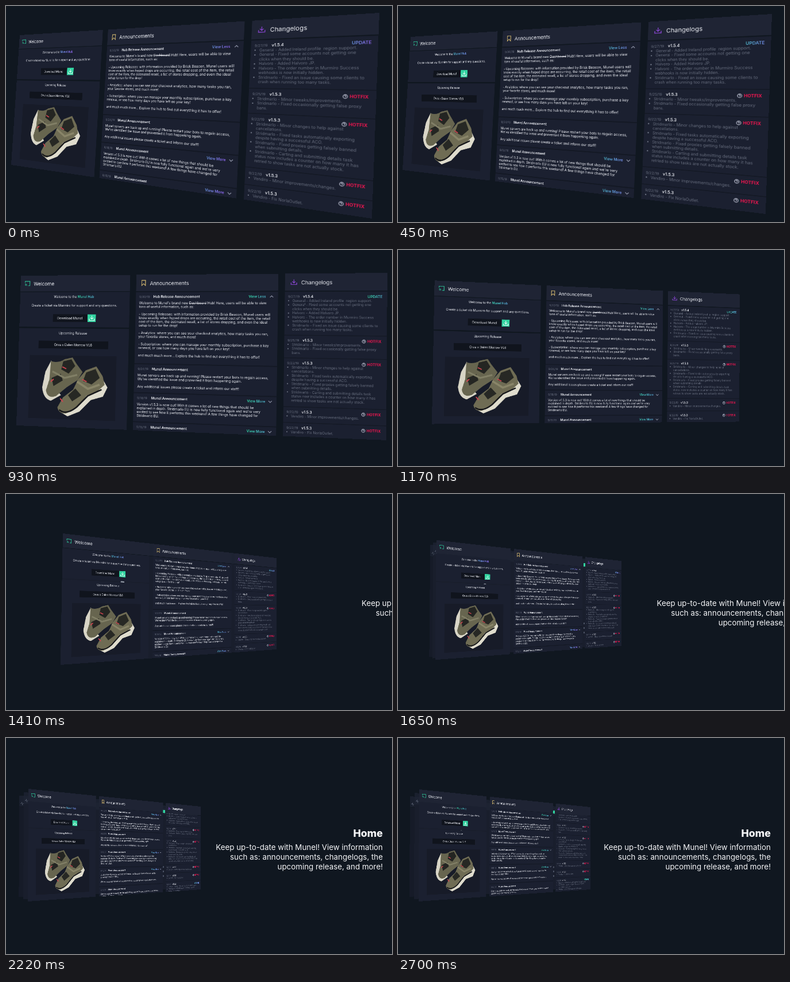
Animation, 672 px wide and 378 px high, one loop 2730 ms. Source, as an HTML page:

```html
<!DOCTYPE html>
<html lang="en">
<head>
<meta charset="utf-8">
<title>Dashboard tour</title>
<style>
html, body { margin: 0; width: 100%; height: 100%; overflow: hidden; background: #101720; }
body { position: relative; font-family: Inter, sans-serif; color: #eceef4; }
.plane, .box, .text, svg { position: absolute; }
.plane { left: 0; top: 0; width: 960px; height: 415px; transform-origin: 0 0; }
.box { overflow: hidden; }
.group { position: absolute; left: 0; top: 0; }
.text { white-space: pre; line-height: 10px; }
.center { transform: translateX(-50%); }
.dim { color: #666c7d; }
.bold { font-weight: 600; }
.hot { color: #ee1650; font-weight: 700; }
.shine {
  font-weight: 600; color: transparent;
  background: linear-gradient(90deg, #31d8a6, #5ba3d8 50%, #8d62ec) var(--shine) 0 / 260% 100%;
  -webkit-background-clip: text; background-clip: text;
}
svg { overflow: visible; fill: none; stroke-width: 1.5; }
#copy { position: absolute; left: 249px; top: 157px; width: 400px; text-align: right; white-space: pre; color: #f5f6f8; }
#copy b { display: block; font-size: 17.8px; font-weight: 800; line-height: 20px; margin-bottom: 6px; }
#copy div { font-size: 13.35px; line-height: 17px; }
</style>
</head>
<body>
<div class="plane" id="back2"></div>
<div class="plane" id="back1"></div>
<div class="plane" id="board"></div>
<div id="copy"><b>Home</b><div>Keep up-to-date with Munel! View information
such as: announcements, changelogs, the
upcoming release, and more!</div></div>
<script>
const LOOP = 2730, W = 960, H = 415, TURN = 1410;
const HEAD = '#1f2434', CARD = '#1b2030', SEAM = '#141925', DARK = '#10141d';
const $ = id => document.getElementById(id);
const board = $('board');

function box(parent, x, y, w, h, color) {
  const el = document.createElement('div');
  el.className = 'box';
  el.style.cssText = `left:${x}px;top:${y}px;width:${w}px;height:${h}px;background:${color}`;
  return parent.appendChild(el);
}
function group(parent) {
  const el = document.createElement('div');
  el.className = 'group';
  return parent.appendChild(el);
}
function text(parent, x, y, size, html, cls = '') {
  const el = document.createElement('div');
  el.className = 'text ' + cls;
  el.style.cssText = `left:${x}px;top:${y - 5}px;font-size:${size}px`;
  el.innerHTML = html;
  return parent.appendChild(el);
}
function icon(parent, x, y, color, path, extra = '') {
  parent.insertAdjacentHTML('beforeend',
    `<svg style="left:${x}px;top:${y}px" width="1" height="1" stroke="${color}"><path d="${path}"/>${extra}</svg>`);
}
const DOWNLOAD = 'M0-7V2M-4-2L0 2L4-2M-7 1V6H7V1';
const chevron = up => up ? 'M-4 2L0-2L4 2' : 'M-4-2L0 2L4-2';

function header(x, w, title, titleX) {
  box(board, x, 0, w, 44, HEAD);
  text(board, titleX, 23, 13.5, title);
}

// Welcome
header(0, 309, 'Welcome', 38);
icon(board, 20, 22, '#2fcf9f', 'M-7-2V-6H7V6H2M-7 1A5 5 0 0 1-2 6M-7 4A2 2 0 0 1-5 6');
box(board, 0, 46, 309, 96, CARD);
box(board, 0, 146, 309, 269, CARD);
text(board, 154, 59, 8.8, 'Welcome to the <span class="shine">Munel Hub</span>', 'center');
text(board, 154, 83, 8.8, 'Create a ticket via Murmiro for support and any questions.', 'center');
box(board, 96, 107, 97, 21, DARK);
text(board, 144, 117.5, 9, 'Download Munel', 'center');
box(board, 194, 107, 23, 21, '#31d3a0');
icon(board, 205.5, 117.5, '#fff', DOWNLOAD);
text(board, 154, 159, 9, 'Upcoming Release', 'center');
box(board, 57, 180, 196, 21, DARK);
text(board, 155, 190.5, 8.8, 'Orva x Dalen Morrow VL6', 'center');
const photo = box(board, 33, 220, 244, 173, '#171b28');
photo.innerHTML = `<svg width="244" height="173" stroke-linejoin="round">
  <path fill="#d8d5c6" d="M62 14L46 45L38 88Q42 120 64 124L92 108L72 86Z"/>
  <path fill="#67654f" d="M61 16Q82 22 100 10L122 5L132 20L151 44L138 66L108 86L78 111Q54 120 49 96L58 66Z"/>
  <path fill="#242522" d="M96 16L119 10L130 28L112 49L91 38ZM64 62L90 50L96 68L70 84Z"/>
  <path stroke="#817f66" stroke-width="5" d="M66 44L101 61L136 52"/>
  <path stroke="#d04450" stroke-width="3" d="M62 72L70 65M94 31L105 36"/>
  <path fill="#dfdccd" d="M205 58L221 84L209 109L176 119L145 151L112 165L90 153L119 132L171 91Z"/>
  <path fill="#6f6c54" d="M160 39L189 28L207 54L213 77L190 98L164 107L138 139L108 157Q86 159 83 141L98 114L126 92L139 64Z"/>
  <path fill="#272824" d="M161 45L187 35L199 59L177 77L153 68ZM112 108L132 89L149 107L124 124Z"/>
  <path stroke="#898569" stroke-width="6" d="M136 70L167 89L199 77"/>
  <path stroke="#151619" stroke-width="4" d="M88 148Q108 163 137 139L167 108L205 90"/>
  <path stroke="#d04450" stroke-width="3" d="M90 117L98 126M151 64L163 70"/></svg>`;

// Announcements
header(326, 370, 'Announcements', 363);
icon(board, 346, 22, '#e5c675', 'M-5-7H5V7L0 2L-5 7Z');
const news = box(board, 326, 46, 370, 369, SEAM);

function announcement(parent, y, height, date, title, lines, more) {
  const card = box(parent, 0, y - 12, 370, height, CARD);
  text(card, 9, 12, 8, date, 'dim');
  text(card, 47, 12, 9, title, 'bold');
  lines.forEach((line, i) => line && text(card, 9, 29 + i * 10, 8.8, line));
  if (more) {
    text(card, 296, 12, 8.9, 'View More', 'shine');
    icon(card, 354, 12, '#9ba0b4', chevron(false));
  }
  return card;
}
const first = announcement(news, 13, 190, '9/30/19', 'Hub Release Announcement', [
  "Welcome to Munel's brand new <s>Dashboard</s> Hub! Here, users will be able to view",
  'tons of useful information, such as:', '',
  '- Upcoming Releases: with information provided by Brisk Beacon, Munel users will',
  'know exactly when hyped drops are occurring, the retail cost of the item, the retail',
  'cost of the item, the estimated resell, a list of stores dropping, and even the ideal',
  'setup to run for the drop!', '',
  '- Analytics: where you can see your checkout analytics, how many tasks you ran,',
  'your favorite stores, and much more!', '',
  '- Subscription: where you can manage your monthly subscription, purchase a key',
  'renewal, or see how many days you have left on your key!', '',
  'and much much more... Explore the hub to find out everything it has to offer!'
]);
const toggle = text(first, 296, 12, 8.9, '', 'shine');
icon(first, 354, 12, '#9ba0b4', chevron(true));
const arrow = first.querySelector('path');

const older = group(news);
const HUB_NEWS = 'Munel Announcement';
announcement(older, 206, 74, '9/24/19', HUB_NEWS, [
  'Munel servers are back up and running! Please restart your bots to regain access,',
  "We've identified the issue and prevented it from happening again.", '',
  'Any additional issues please create a ticket and inform our staff!'
]);
announcement(older, 283, 74, '9/18/19', HUB_NEWS, [
  'Version v1.5.3 is now out! With it comes a lot of new things that should be',
  "explained in depth. Stridmarlo EU is now fully functional again and we're very",
  'excited to see how it performs this weekend! A few things have changed for',
  'Stridmarlo EU.'
], true);
announcement(older, 360, 77, '9/15/19', HUB_NEWS, [
  'Just a friendly reminder that our Admins and Support team will never ask for',
  'your key through DMs.', '',
  "We've received reports of impersonations occurring in attempt to fraudsters."
], true);
announcement(older, 440, 90, '9/12/19', HUB_NEWS, [
  'Due to popular request, and to make things easier for you guys we have revised',
  'additionally the removal process.'
]);

// Changelogs
header(713, 247, 'Changelogs', 753);
icon(board, 735, 22, '#9348e0', DOWNLOAD);
const logs = group(box(board, 713, 46, 247, 369, SEAM));

function release(y, height, date, version, update, lines) {
  const card = box(logs, 0, y - 58, 247, height, CARD);
  text(card, 8, 12, 8, date, 'dim');
  text(card, 45, 12, 8.8, version, 'bold');
  text(card, 201, 13, 8.8, update ? 'UPDATE' : 'HOTFIX', update ? 'shine' : 'hot');
  if (!update) {
    icon(card, 193, 13, '#a6aabb', 'M-4 0a4 4 0 1 0 8 0a4 4 0 1 0-8 0M-1.4-1C-1-3 2-2 1 0L0 1.2M0 2V2.6');
  }
  lines.forEach((line, i) => {
    const row = 22.5 + i * 10.5, wrapped = line[0] === '~';
    if (!wrapped) box(card, 8, row - 1.5, 3, 3, '#737989').style.borderRadius = '50%';
    text(card, 19, row, 8.6, wrapped ? line.slice(1) : line, 'dim');
  });
}
release(59, 110, '9/27/19', 'v1.5.4', true, [
  'General - Added Ireland profile  region support.',
  'General - Fixed some accounts not getting one', '~clicks when they should be.',
  'Halvoro - Added Halvoro JP.',
  'Halvoro - The order number in Murmiro Success', '~webhooks is now initially hidden.',
  'Stridmarlo - Fixed an issue causing some clients to', '~crash when running too many tasks.'
]);
release(171, 56, '9/25/19', 'v1.5.3', false, [
  'Stridmarlo - Minor tweaks/improvements.',
  'Stridmarlo - Fixed occasionally getting false proxy', '~bans.'
]);
release(229, 122, '9/22/19', 'v1.5.3', false, [
  'Stridmarlo - Minor changes to help against', '~cancellations.',
  'Stridmarlo - Fixed tasks automatically exporting', '~despite having a successful ACO.',
  'Stridmarlo - Fixed proxies getting falsely banned', '~when submitting details.',
  'Stridmarlo - Carting and submitting details task',
  '~status now includes a counter on how many it has', '~retried to show tasks are not actually stock.'
]);
release(353, 38, '9/22/19', 'v1.5.3', false, ['Vendiro - Minor improvements/changes.']);
release(393, 38, '9/22/19', 'v1.5.3', false, ['Vendiro - Fix NorlaOutlet.']);
release(433, 90, '9/20/19', 'v1.5.2', true, [
  'General - Added new settings for the task page.',
  'Stridmarlo - Added support for more regions', '~and faster checkout.',
  'Vendiro - Minor improvements/changes.'
]);

// Pages stacked behind the board
for (const [id, color] of [['back1', '#191e2c'], ['back2', '#161b28']]) {
  const page = $(id);
  box(page, 0, 0, W, 44, HEAD).style.opacity = .7;
  box(page, 0, 46, W, H - 46, color);
  icon(page, 10, 32, '#596071', 'M-5 0H-2L0-5L2 5L4 0H7');
}
box($('back1'), 716, 21, 16, 16, '#31d3a0');
box($('back1'), 199, 139, 14, 14, '#9aa2ae').style.borderRadius = '50%';
for (let i = 0; i < 3; i++) box($('back1'), 718, 300 + i * 22, 8, 8, '#4a5163');

// Board corners (top left, top right, bottom right, bottom left) at each key time
const settle = t => t < TURN ? t : TURN + 232.6 * (1 - Math.exp((TURN - t) / 232.6));
const KEY_TIMES = [0, 450, 930, 1410, 1890, 2220, 2700].map(settle);
const POSES = [
  [24, 51, 650, 12, 637, 372, 9, 278],
  [22, 54, 651, 14, 640, 364, 8, 287],
  [26, 45, 664, 40, 662, 333, 18, 307],
  [99, 69, 471, 112, 471, 272, 95, 299],
  [49, 86, 356, 119, 356, 265, 48, 287],
  [39, 89, 339, 120, 339, 265, 38, 286],
  [37, 90, 335, 121, 335, 265, 36, 286]
];
const END = KEY_TIMES[6];

// Monotone cubic through the key poses
function track(c, s) {
  const n = POSES.length - 1;
  const rate = i => (POSES[i + 1][c] - POSES[i][c]) / (KEY_TIMES[i + 1] - KEY_TIMES[i]);
  const slope = i => {
    if (i === 0) return rate(0);
    if (i === n) return rate(n - 1);
    const a = rate(i - 1), b = rate(i);
    return a * b > 0 ? 2 * a * b / (a + b) : 0;
  };
  let i = 0;
  while (i < n - 1 && s > KEY_TIMES[i + 1]) i++;
  const d = KEY_TIMES[i + 1] - KEY_TIMES[i], u = Math.min(1, (s - KEY_TIMES[i]) / d), v = 1 - u;
  return POSES[i][c] * v * v * (1 + 2 * u) + POSES[i + 1][c] * u * u * (3 - 2 * u)
    + d * u * v * (slope(i) * v - slope(i + 1) * u);
}

function project(el, [x0, y0, x1, y1, x2, y2, x3, y3]) {
  const ax = x1 - x2, ay = y1 - y2, bx = x3 - x2, by = y3 - y2;
  const sx = x0 - x1 + x2 - x3, sy = y0 - y1 + y2 - y3, det = ax * by - bx * ay;
  const g = (sx * by - bx * sy) / det, h = (ax * sy - sx * ay) / det;
  const m = [
    (x1 - x0 + g * x1) / W, (y1 - y0 + g * y1) / W, 0, g / W,
    (x3 - x0 + h * x3) / H, (y3 - y0 + h * y3) / H, 0, h / H,
    0, 0, 1, 0, x0, y0, 0, 1
  ];
  el.style.transform = `matrix3d(${m.map(v => v.toFixed(9)).join()})`;
}

const approach = (t, start, rate) => t < start ? 0 : 1 - Math.exp((start - t) * rate);

function render(t) {
  const s = settle(t), corners = POSES[0].map((_, c) => track(c, s));
  project(board, corners);

  const spread = Math.max(0, (s - TURN) / (END - TURN));
  const drift = [-8, 6, -6, 4, -6, -4, -8, -4];
  [1, 2].forEach(k => {
    const page = $('back' + k);
    page.style.display = spread > 0 ? '' : 'none';
    project(page, corners.map((v, c) => v + drift[c] * k * spread));
  });

  const fold = 110 * approach(t, 1900, .0067);
  first.style.height = 190 - fold + 'px';
  older.style.transform = `translateY(${-fold}px)`;
  logs.style.transform = `translateY(${-75 * approach(t, 1860, .0033)}px)`;
  const open = t < 1800;
  toggle.textContent = open ? 'View Less' : 'View More';
  arrow.setAttribute('d', chevron(open));

  const hue = 50 - 50 * Math.cos((t - 930) / 1800 * 2 * Math.PI);
  board.style.setProperty('--shine', hue + '%');
  $('copy').style.transform = `translateX(${1.13 * (END - s)}px)`;
}

const start = performance.now();
function frame() {
  render((performance.now() - start) % LOOP);
  requestAnimationFrame(frame);
}
frame();
</script>
</body>
</html>
```
